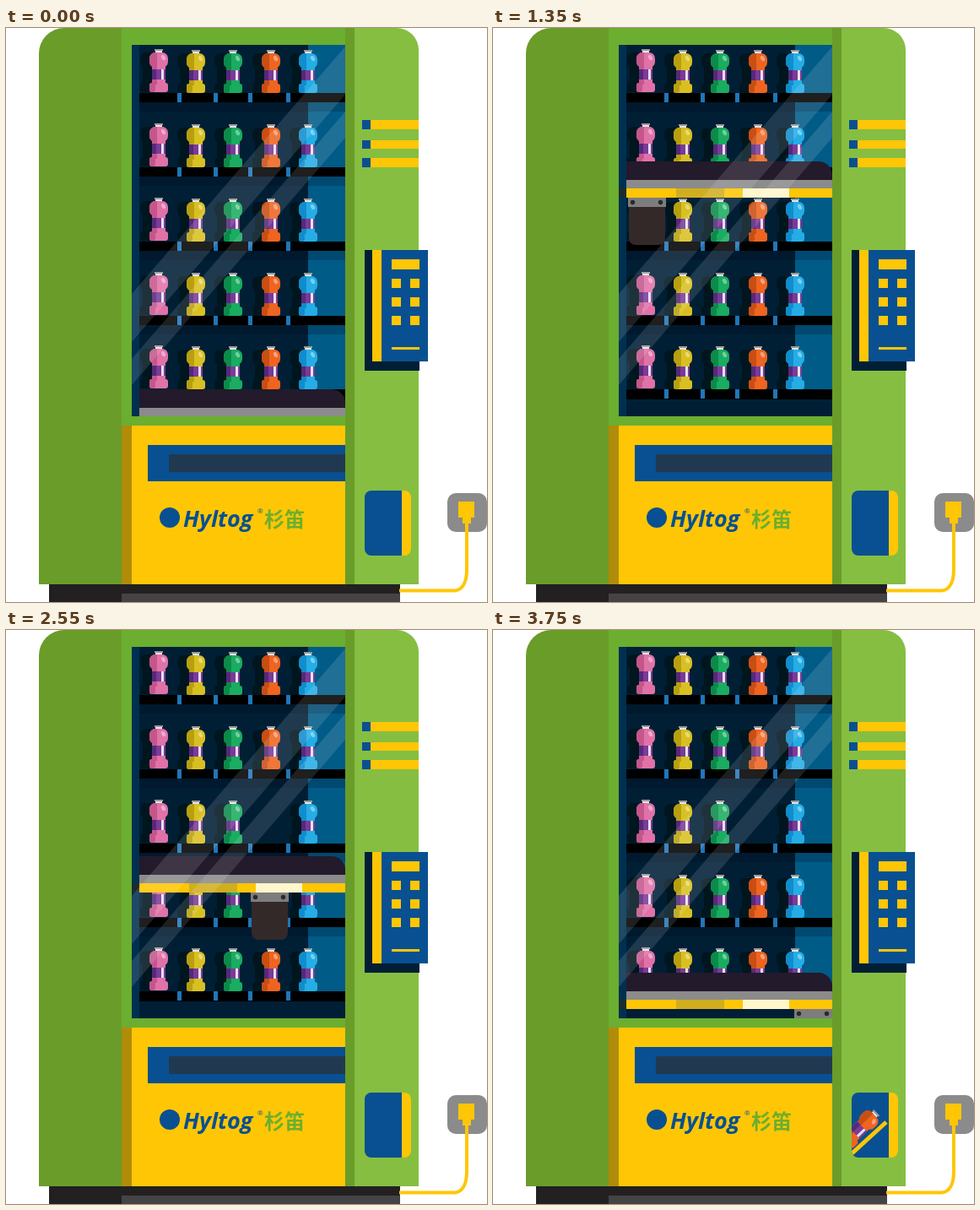
An HTML page with a canvas that plays this animation: 570x680 px, repeating every 5750 ms.

```html
<!DOCTYPE html>
<html lang="en">
<head>
<meta charset="utf-8">
<title>Vending machine</title>
<style>
html, body { margin: 0; width: 100%; height: 100%; overflow: hidden; background: #fff; }
canvas { display: block; }
</style>
</head>
<body>
<canvas id="stage" width="570" height="680"></canvas>
<script>
const ctx = document.getElementById('stage').getContext('2d');

const STEP = 50, LOOP = 5750;
const GREEN = '#6bae30', DARK_GREEN = '#6a9c29', LIGHT_GREEN = '#86be42';
const YELLOW = '#ffc605', BLUE = '#085091', NAVY = '#001f35', GREY = '#8b8b8b';

const SHELVES = [77, 165, 253, 341, 428];
const COLUMNS = [
  { x: 181, color: '#e072a8', shade: '#c4568c' },
  { x: 225, color: '#d8c022', shade: '#b89f10' },
  { x: 269, color: '#1aac60', shade: '#0c8a4a' },
  { x: 314, color: '#ee6420', shade: '#c84e14' },
  { x: 358, color: '#25ade6', shade: '#118ccc' }
];
const PICK = { row: 2, col: 3 };

// Edges are given as left, top, right, bottom.
function box(color, l, t, r, b) {
  ctx.fillStyle = color;
  ctx.fillRect(l, t, r - l, b - t);
}

function round(color, l, t, r, b, radius) {
  ctx.fillStyle = color;
  ctx.beginPath();
  ctx.roundRect(l, t, r - l, b - t, radius);
  ctx.fill();
}

function dot(color, x, y, r) {
  ctx.fillStyle = color;
  ctx.beginPath();
  ctx.arc(x, y, r, 0, Math.PI * 2);
  ctx.fill();
}

function clipped(l, t, r, b, radius, draw) {
  ctx.save();
  ctx.beginPath();
  ctx.roundRect(l, t, r - l, b - t, radius);
  ctx.clip();
  draw();
  ctx.restore();
}

function silhouette(color) {
  round(color, -11, -47, 11, -29, 7);
  box(color, -8, -32, 8, -9);
  round(color, -11, -11, 11, 0, 3);
}

// The origin is the middle of the bottle's base.
function bottle({ color, shade }) {
  box('#e6e6e6', -4, -49, 4, -45);
  box('#9a9a9a', -5, -51, 5, -49);
  silhouette(color);
  round(shade, -11, -47, -2, -29, [7, 0, 0, 7]);
  box(shade, -8, -30, -2, -9);
  round(shade, -11, -11, -4, 0, 3);
  box('#7a3a98', -8, -27, 8, -15);
  box('#56287a', -8, -27, -3, -15);
  box('#e8e0ee', 3, -27, 6, -15);
  ctx.fillStyle = 'rgba(255,255,255,.4)';
  ctx.beginPath();
  ctx.ellipse(5.5, -41, 2.3, 3.4, -.5, 0, Math.PI * 2);
  ctx.fill();
}

function at(x, y, draw) {
  ctx.save();
  ctx.translate(x, y);
  draw();
  ctx.restore();
}

function cabinet() {
  clipped(39, 0, 489, 659, [30, 26, 0, 0], () => {
    box(DARK_GREEN, 39, 0, 137, 659);
    box(GREEN, 137, 0, 402, 659);
    box(DARK_GREEN, 402, 0, 413, 659);
    box(LIGHT_GREEN, 413, 0, 489, 659);
  });
  box('#222021', 51, 659, 467, 680);
  box('#454344', 137, 670, 467, 680);
  box('#b08c08', 137, 471, 149, 659);
  box(YELLOW, 149, 471, 402, 659);
  box(BLUE, 168, 494, 402, 537);
  box('#213950', 193, 505, 402, 526);

  for (const [top, bottom] of [[109, 120], [133, 143], [154, 165]]) {
    box(BLUE, 422, top, 432, bottom);
    box(YELLOW, 432, top, 489, bottom);
  }
}

function keypad() {
  box(NAVY, 425, 263, 490, 406);
  box(YELLOW, 434, 263, 445, 395);
  box(BLUE, 445, 263, 500, 395);
  box(YELLOW, 457, 274, 490, 286);
  for (const y of [297, 319, 341]) {
    box(YELLOW, 457, y, 468, y + 11);
    box(YELLOW, 479, y, 490, y + 11);
  }
  box(YELLOW, 457, 378, 490, 381);
}

function brand() {
  dot(BLUE, 194, 580, 12);
  ctx.textBaseline = 'alphabetic';
  ctx.fillStyle = BLUE;
  ctx.font = 'italic 700 27px "Open Sans", sans-serif';
  ctx.fillText('Hyltog', 210, 591);
  ctx.font = '8px "Open Sans", sans-serif';
  ctx.fillText('®', 298, 575);
  ctx.fillStyle = GREEN;
  ctx.font = '700 24px "Noto Sans CJK SC", "Noto Sans CJK", sans-serif';
  ctx.fillText('杉笛', 306, 591);
}

function plug() {
  round(GREY, 523, 551, 570, 597, 10);
  box(YELLOW, 536, 561, 555, 580);
  box(YELLOW, 541, 580, 551, 587);
  ctx.strokeStyle = YELLOW;
  ctx.lineWidth = 4;
  ctx.beginPath();
  ctx.moveTo(546, 586);
  ctx.lineTo(546, 642);
  ctx.bezierCurveTo(546, 658, 540, 666, 532, 666.5);
  ctx.lineTo(466, 666.5);
  ctx.stroke();
}

function shelves(picked) {
  box(NAVY, 149, 20, 402, 460);
  box('#005b87', 358, 20, 402, 428);
  SHELVES.forEach((y, row) => {
    if (row < 4) box('rgba(0,0,20,.2)', 158, y + 11, 402, y + 22);
    box('#000', 158, y, 402, y + (row === 4 ? 12 : 11));
    for (const x of [203, 246, 287, 332]) box('#2076b8', x, y, x + 5, y + 11);

    COLUMNS.forEach((col, i) => {
      if (picked && row === PICK.row && i === PICK.col) return;
      const base = y - (i === 0 ? 1 : 0);
      at(col.x - 11, base, () => silhouette('#00161f'));
      at(col.x, base, () => bottle(col));
    });
  });
  box('#003050', 149, 20, 158, 460);
}

function lift(x, y) {
  // carriage
  round('#231a2b', 158, y, 402, y + 22, [0, 16, 0, 0]);
  box(GREY, 158, y + 22, 402, y + 32);
  box('#1b2c30', 149, y + 32, 158, y + 43);
  box(YELLOW, 158, y + 32, 402, y + 43);
  box('#d0ae20', 217, y + 32, 274, y + 43);
  box('#fff6cc', 296, y + 32, 351, y + 43);
  // grabber
  round('#332929', x + 1, y + 50, x + 44, y + 99, [0, 0, 8, 8]);
  box('#7d7d7d', x, y + 43, x + 45, y + 54);
  dot('#2c2829', x + 5.5, y + 48.5, 2.7);
  dot('#2c2829', x + 38.5, y + 48.5, 2.7);
}

function glare(top, bottom) {
  const rise = 293;
  ctx.fillStyle = 'rgba(255,255,255,.12)';
  ctx.beginPath();
  ctx.moveTo(149, top);
  ctx.lineTo(402, top - rise);
  ctx.lineTo(402, bottom - rise);
  ctx.lineTo(149, bottom);
  ctx.fill();
}

function hatch(reveal) {
  clipped(425, 548, 480, 625, 8, () => {
    box(BLUE, 425, 548, 469, 625);
    box(YELLOW, 469, 548, 480, 625);
    if (reveal <= 0) return;
    ctx.globalAlpha = reveal;
    at(418, 607, () => {
      ctx.rotate(46 * Math.PI / 180);
      bottle(COLUMNS[PICK.col]);
    });
    ctx.strokeStyle = YELLOW;
    ctx.lineWidth = 5;
    ctx.beginPath();
    ctx.moveTo(422, 623);
    ctx.lineTo(466, 583);
    ctx.stroke();
  });
}

const clamp = (v, lo, hi) => Math.min(hi, Math.max(lo, v));

// Up, across to the bottle, down, then out to the hatch; 10px per step.
function pose(n) {
  const up = clamp(n, 0, 27), across = clamp(n - 27, 0, 13);
  const down = Math.min(248, 10 * clamp(n - 40, 0, 25));
  const out = clamp(10 * (n - 65), 0, 67);
  return {
    x: 160 + 10 * across + out,
    y: 428 - 10 * up + down,
    picked: n > 40,
    reveal: clamp((n - 71) / 4, 0, 1)
  };
}

function render(time) {
  const { x, y, picked, reveal } = pose(Math.floor((time % LOOP) / STEP));
  box('#fff', 0, 0, 570, 680);
  cabinet();
  keypad();
  brand();
  plug();
  clipped(149, 20, 402, 460, 0, () => {
    shelves(picked);
    lift(x, y);
    glare(315, 372);
    glare(392, 423);
  });
  hatch(reveal);
}

const start = performance.now();
function tick() {
  render(performance.now() - start);
  requestAnimationFrame(tick);
}
tick();
</script>
</body>
</html>
```
